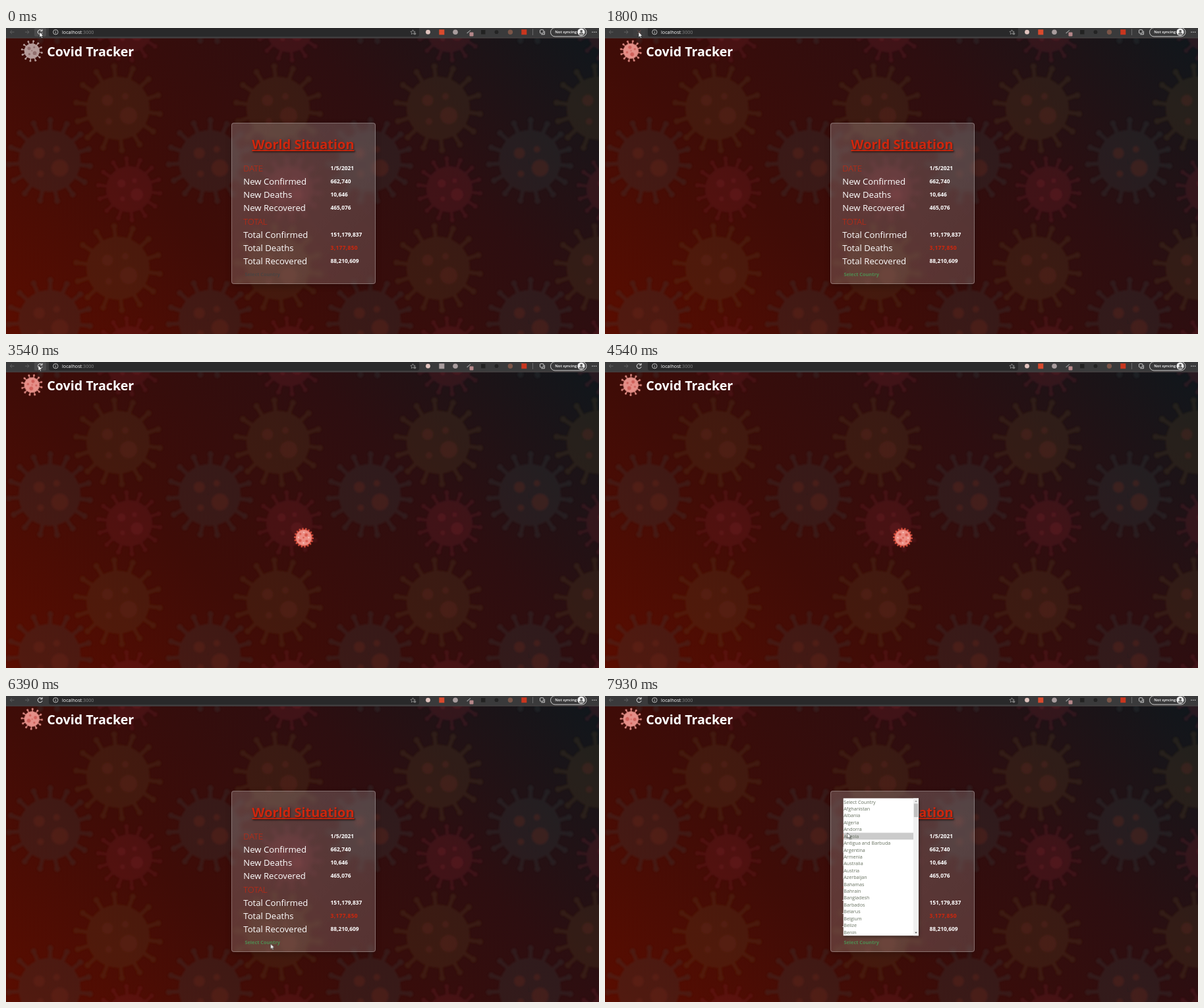
Write an HTML page that moves like this. It is 900 px wide and 465 px high and loops after 8000 ms.

```html
<!DOCTYPE html>
<html lang="en">
<head>
<meta charset="utf-8">
<title>Covid Tracker</title>
<style>
html, body { margin: 0; width: 100%; height: 100%; overflow: hidden; background: #2e0e0c; }
#stage { position: relative; width: 900px; height: 465px; overflow: hidden;
  background: linear-gradient(45deg, #5a0d00, #3f0c07 33%, #2d0e10 67%, #10171c) 0 15px / 900px 450px no-repeat; }
svg { position: absolute; left: 0; top: 0; }
text { font-family: "Open Sans", "Noto Sans", sans-serif; fill: #fff; }
.spin { transform-box: view-box; }
#card { position: absolute; left: 342px; top: 144px; width: 217px; height: 243px;
  border: 1px solid rgba(255,255,255,.28); border-radius: 4px;
  background: linear-gradient(135deg, rgba(255,255,255,.2), rgba(255,255,255,.16));
  backdrop-filter: blur(3px); box-shadow: 0 3px 10px rgba(0,0,0,.22); }
.head { font-size: 19.95px; font-weight: 700; fill: #cf260d; text-decoration: underline;
  text-shadow: 1px 1px 2px rgba(0,0,0,.45); }
.label { font-size: 13.15px; }
.section { font-size: 13px; font-weight: 300; fill: #cf260d; }
.value { font-size: 8.4px; font-weight: 700; }
.alert { fill: #cf260d; letter-spacing: .35px; }
.option { font-size: 7.2px; fill: #66705f; }
</style>
</head>
<body>
<div id="stage">
  <svg id="back" width="900" height="465">
    <filter id="soft" x="-5%" y="-5%" width="110%" height="110%"><feGaussianBlur stdDeviation="1.6"/></filter>
    <g id="pattern" filter="url(#soft)"></g>
  </svg>
  <div id="card"></div>
  <svg id="front" width="900" height="465">
    <g id="toolbar">
      <rect width="900" height="15.5" fill="#3a3a3b"/>
      <rect x="65" y="-3" width="562" height="16" rx="3" fill="#29292a"/>
      <rect y="14.4" width="900" height="1" fill="#4a4345"/>
      <g fill="none" stroke="#666" stroke-width=".9">
        <path d="M12.5 6.2H6.5M9 3.5L6.3 6.2L9 8.9M29 6.2H35M32.3 3.5L35 6.2L32.3 8.9"/>
      </g>
      <rect id="hover" x="43" y="0" width="18" height="13" rx="2" fill="#4b4b4c"/>
      <g id="reload" fill="none" stroke="#eee" stroke-width="1">
        <path d="M54.6 4.2A3.5 3.5 0 1 0 55.1 7.2M55 1.9V4.7H52.2"/>
      </g>
      <path id="stop" d="M49.2 3.6L54.4 8.8M54.4 3.6L49.2 8.8" stroke="#805954" stroke-width=".9"/>
      <g fill="none" stroke="#ddd" stroke-width=".8">
        <circle cx="75.3" cy="6.2" r="3.7"/><path d="M75.3 5.6V8.4M75.3 3.9V4.7"/>
      </g>
      <text x="85" y="8.8" font-size="7.2">localhost<tspan fill="#858585">:3000</tspan></text>
      <path d="M617.5 2.8L618.6 5.1L621 5.4L619.3 7.1L619.7 9.5L617.5 8.3L615.3 9.5L615.7 7.1L614 5.4L616.4 5.1Z" fill="none" stroke="#aaa" stroke-width=".7"/>
      <circle cx="620.5" cy="8.6" r="1.9" fill="#777"/>
      <circle cx="640.5" cy="6.2" r="3.4" fill="#e2c4bf"/>
      <rect id="extension" x="657.3" y="2.3" width="8" height="8" fill="#d94a2e"/>
      <circle cx="682" cy="6.2" r="3.8" fill="#a99d9e"/>
      <rect x="703.5" y="6.6" width="6" height="6" rx="1" fill="#b5878a"/>
      <path d="M699.6 8L705 3.4" stroke="#999" stroke-width="1.2"/>
      <rect x="721" y="3" width="6.5" height="6.5" fill="#222"/>
      <circle cx="744.5" cy="6.2" r="2.9" fill="#242424"/>
      <circle cx="765.4" cy="6.2" r="3.7" fill="#7a5548"/>
      <rect x="782.3" y="2.2" width="8" height="8" fill="#c9361f"/>
      <path d="M799.5 1.5V11" stroke="#777" stroke-width=".8"/>
      <g fill="none" stroke="#ddd" stroke-width=".9">
        <rect x="810.5" y="2.7" width="5.3" height="5.3" rx="1"/>
        <path d="M817.4 4.7V9.8H812.3"/>
        <rect x="826.5" y="-.4" width="54.5" height="13.4" rx="6.7"/>
      </g>
      <text x="833.3" y="8.3" font-size="5.8" font-weight="600">Not syncing</text>
      <circle cx="873" cy="6.2" r="5.6" fill="#eee"/>
      <circle cx="873.2" cy="4.8" r="1.9" fill="#555"/>
      <path d="M869.6 10.4a3.6 3.6 0 0 1 7.2 0Z" fill="#777"/>
      <g fill="#ddd"><circle cx="890" cy="6.2" r=".75"/><circle cx="892.8" cy="6.2" r=".75"/><circle cx="895.6" cy="6.2" r=".75"/></g>
    </g>
    <g id="logoTone"><g id="logo" class="spin"></g></g>
    <text x="62.3" y="43.3" font-size="19.6" font-weight="700">Covid Tracker</text>
    <g id="report"></g>
    <g id="loader"><g id="loaderBody" class="spin"></g></g>
    <g id="menu"></g>
    <path id="cursor" d="M0 0V8.2L1.9 6.5L3.2 9.3L4.5 8.7L3.2 6H5.8Z" fill="#fff" stroke="#222" stroke-width=".6"/>
  </svg>
</div>
<script>
const LOOP = 8000;
const $ = id => document.getElementById(id);
const circle = (x, y, r, extra = '') => `<circle cx="${x}" cy="${y}" r="${r}" ${extra}/>`;
const label = (x, y, cls, s) => `<text x="${x}" y="${y}" class="${cls}">${s}</text>`;

// Body with evenly spaced spikes that end in knobs.
function virus(x, y, r, reach, count, width, knob, color) {
  let out = circle(x, y, r);
  for (let i = 0; i < count; i++) {
    const a = (i + .3) * 2 * Math.PI / count;
    const ex = x + Math.cos(a) * reach, ey = y + Math.sin(a) * reach;
    out += `<path d="M${x} ${y}L${ex.toFixed(2)} ${ey.toFixed(2)}" stroke="${color}" stroke-width="${width}"/>`
         + circle(ex.toFixed(2), ey.toFixed(2), knob);
  }
  return `<g fill="${color}">${out}</g>`;
}

// Background tile
const TILE = 243;
const kinds = [
  { x: 170, y: 122, r: 48, reach: 64, n: 14, color: '#5f4b1e', spot: '#6b2c2c' },
  { x: 66, y: 202, r: 47, reach: 62, n: 15, color: '#325052', spot: '#7c2a22' },
  { x: 187, y: 245, r: 35, reach: 47, n: 14, color: '#8e2c38', spot: '#7c2630' }
];
let tiles = '';
for (let row = -1; row < 2; row++) for (let col = -1; col < 4; col++) for (const k of kinds) {
  const x = k.x + col * TILE, y = k.y + row * TILE, s = k.r / 48;
  tiles += `<g opacity=".2">${virus(x, y, k.r, k.reach, k.n, 6 * s, 4.5 * s, k.color)}</g>`
    + `<g fill="${k.spot}" opacity=".26">`
    + circle(x + 16 * s, y + 11 * s, 13 * s) + circle(x - 16 * s, y - 12 * s, 8.5 * s)
    + circle(x + 11 * s, y - 18 * s, 5 * s) + circle(x - 14 * s, y + 20 * s, 5 * s) + '</g>';
}
$('pattern').innerHTML = tiles;

// Spinning icons
$('logo').innerHTML = virus(39.3, 35, 11.6, 15.2, 12, 1.5, 1.5, '#e58f88')
  + '<g fill="#cf5f59">' + circle(35, 31, 2.5) + circle(43.6, 38.2, 2.9) + circle(42.8, 29.2, 1.5)
  + circle(35.4, 39.8, 1.7) + circle(39.3, 34.6, 1) + '</g>';
$('loaderBody').innerHTML = virus(452, 267, 12.6, 13.8, 18, 1.8, 1.2, '#e5523f')
  + circle(452, 267, 11.8, 'fill="#ec8f85"')
  + '<g fill="#d95a4e">' + circle(447, 262, 2.2) + circle(456.5, 270, 2.5) + circle(457, 261, 1.6)
  + circle(447.5, 272, 1.9) + circle(452, 266.5, 1.3) + '</g>'
  + '<g fill="#f6c2ba">' + circle(451.5, 259, 1.2) + circle(444, 267.5, 1.2) + circle(453, 274.5, 1.2) + circle(460, 266, 1.1) + '</g>';

// Report card
const rows = [
  ['DATE', '1/5/2021', 'section'], ['New Confirmed', '662,740'], ['New Deaths', '10,646'],
  ['New Recovered', '465,076'], ['TOTAL', '', 'section'], ['Total Confirmed', '151,179,837'],
  ['Total Deaths', '3,177,850', 'label', 'alert'], ['Total Recovered', '88,210,609']
];
$('report').innerHTML = label(373.3, 184.2, 'head', 'World Situation')
  + rows.map(([name, value, cls = 'label', tone = ''], i) => {
    const y = 213 + i * 20.18;
    return label(360.3, y + 4.9, cls, name) + label(492.5, y + 2.9, 'value ' + tone, value);
  }).join('')
  + '<text id="select" x="362.4" y="377" font-size="7.36" font-weight="700" style="fill:#4f8c52">Select Country</text>';

// Country menu
const PITCH = 10.42;
const countries = ('Select Country,Afghanistan,Albania,Algeria,Andorra,Angola,Antigua and Barbuda,Argentina,Armenia,'
  + 'Australia,Austria,Azerbaijan,Bahamas,Bahrain,Bangladesh,Barbados,Belarus,Belgium,Belize,Benin').split(',');
$('menu').innerHTML = '<rect x="361.7" y="155.4" width="114.3" height="208.8" fill="#fff" style="filter:drop-shadow(1px 2px 2px rgba(0,0,0,.4))"/>'
  + `<rect id="pick" x="362" y="155.7" width="106" height="${PITCH}" fill="#cbcbcb"/>`
  + '<rect x="468" y="155.4" width="8" height="208.8" fill="#f0f0f0"/>'
  + '<rect x="468.8" y="163.5" width="6.4" height="20.5" fill="#c1c1c1"/>'
  + '<path d="M470.2 160.8L472 158.8L473.8 160.8Z" fill="#999"/><path d="M470.2 358.8L472 360.8L473.8 358.8Z" fill="#444"/>'
  + countries.map((c, i) => label(362.3, (163.6 + i * PITCH).toFixed(2), 'option', c)).join('');

// Animation from [time, value] tables
function play(el, prop, table, hard = true) {
  const frames = table.map(([t, v]) => ({ offset: t / LOOP, [prop]: v, easing: hard ? 'steps(1, end)' : 'linear' }));
  const last = table[table.length - 1];
  if (last[0] < LOOP) frames.push({ offset: 1, [prop]: last[1] });
  el.animate(frames, { duration: LOOP, iterations: Infinity });
}
const show = (id, table) => play($(id), 'opacity', table);
function spin(id, x, y, period) {
  $(id).style.transformOrigin = `${x}px ${y}px`;
  play($(id), 'transform', [[0, 'rotate(0deg)'], [LOOP, `rotate(${360 * LOOP / period}deg)`]], false);
}

spin('logo', 39.3, 35, 20000);
spin('loaderBody', 452, 267, 2000);

const cardTimes = [[0, 1], [640, 0], [1790, 1], [3500, 0], [4700, 1]];
show('card', cardTimes);
show('report', cardTimes);
show('loader', [[0, 0], [700, 1], [1790, 0], [3500, 1], [4700, 0]]);
const stopTimes = [[0, 0], [560, 1], [2100, 0], [3620, 1], [4200, 0]];
show('stop', stopTimes);
show('reload', stopTimes.map(([t, v]) => [t, 1 - v]));
show('hover', [[0, 1], [560, .25], [2100, 1], [3620, .25], [4200, 0]]);
play($('extension'), 'fill', [[0, '#d94a2e'], [560, '#a99d9e'], [800, '#d94a2e'], [3400, '#a99d9e'], [3800, '#d94a2e']]);
play($('logoTone'), 'filter', [[0, 'grayscale(.7)'], [640, 'grayscale(0)']]);
play($('select'), 'fill', [[0, '#4a4442'], [640, '#4f8c52']]);

show('menu', [[0, 0], [6420, 1]]);
const rowAt = i => `translate(0px, ${i * PITCH}px)`;
const picks = [[0, rowAt(0)], [7010, rowAt(19)], [7090, rowAt(18)]];
for (let i = 17; i >= 5; i--) picks.push([7130 + (18 - i) * 42, rowAt(i)]);
play($('pick'), 'transform', picks);

show('cursor', [[0, 1], [4250, 0], [5480, 1]]);
play($('cursor'), 'transform', [
  [0, 51, 6], [2700, 51, 6], [3200, 49, 5], [4250, 49, 5], [5480, 330, 300], [5900, 403, 384], [6300, 402, 377],
  [6900, 399, 373], [7160, 393, 335], [7680, 367, 209], [7900, 367.8, 208]
].map(([t, x, y]) => [t, `translate(${x}px, ${y}px)`]), false);
</script>
</body>
</html>
```
